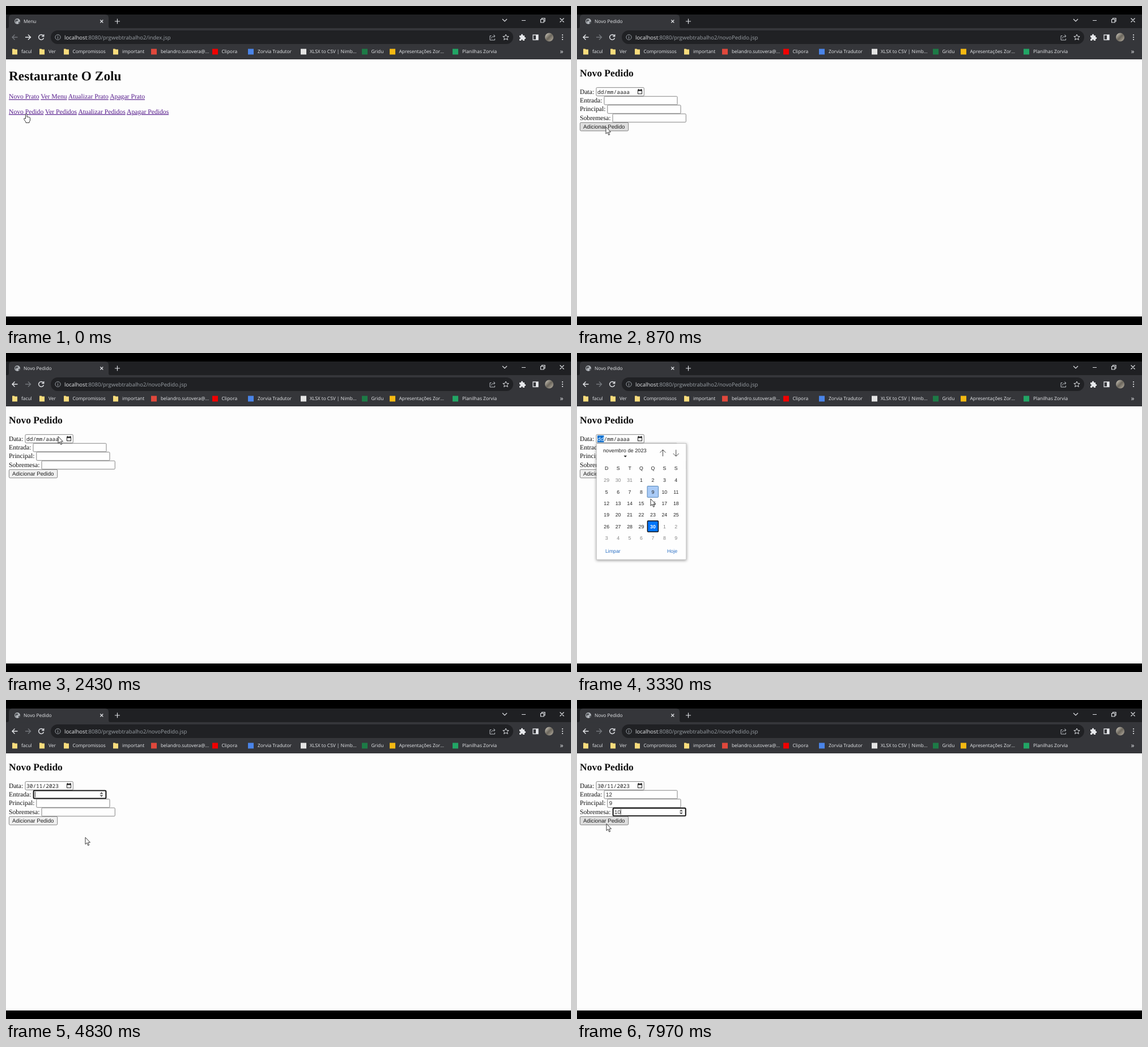
An HTML page for the animation above (8 s loop, 997 by 562 pixels).

```html
<!DOCTYPE html>
<html lang="pt-BR">
<head>
<meta charset="utf-8">
<title>Novo Pedido</title>
<style>
  html, body { margin: 0; width: 100%; height: 100%; overflow: hidden; background: #000; }
  svg { display: block; width: 997px; height: 562px; }
  text { text-rendering: geometricPrecision; white-space: pre; }
  .ui { font: 8.35px "Open Sans", sans-serif; fill: #e8eaed; }
  .url { font-size: 9.55px; fill: #9aa0a6; }
  .page { font: 11.68px "Liberation Serif", serif; fill: #111; }
  .links { fill: #551a8b; }
  .links tspan { text-decoration: underline; }
  .form { font: 9.73px "Liberation Sans", sans-serif; fill: #222; }
  .date { font: 9.5px "Noto Sans Mono", monospace; fill: #222; }
  .cal { font: 8.76px "Liberation Sans", sans-serif; fill: #222; }
  .mid { text-anchor: middle; }
  .line { fill: none; stroke: #dfe1e5; stroke-width: 1.2; }
  .box { fill: #fefefe; stroke: #767676; stroke-width: .9; }
  .ring { fill: none; stroke: #101010; stroke-width: 1.8; }
</style>
</head>
<body>
<svg viewBox="0 0 997 562">
  <defs>
    <linearGradient id="photo" x2="1" y2="1">
      <stop stop-color="#d9d4c8"/><stop offset=".5" stop-color="#6b665c"/><stop offset="1" stop-color="#b9b2a4"/>
    </linearGradient>
    <filter id="shadow" x="-10%" y="-10%" width="120%" height="120%">
      <feDropShadow dx="0" dy="1" stdDeviation="2.5" flood-opacity=".45"/>
    </filter>
  </defs>

  <!-- Window -->
  <rect width="997" height="562"/>
  <rect y="15" width="997" height="25" fill="#1f2023"/>
  <rect y="39" width="997" height="55" fill="#35363a"/>
  <path d="M1 39.5q4 0 4-4V21q0-6 6-6H175q6 0 6 6V35.500q0 4 4 4Z" fill="#35363a"/>
  <rect y="94" width="997" height="453" fill="#fdfdfd"/>
  <rect x="79" y="43" width="816" height="24" rx="12" fill="#202124"/>

  <!-- Tab strip -->
  <circle cx="20" cy="27" r="5" fill="#b4b8bd"/>
  <path d="M16 25q3-3 5-1t-2 3 0 3q-3 0-3-3ZM22 28q2-1 3 0-1 3-3 3Z" fill="#55585d"/>
  <text id="tab" class="ui" x="31" y="30"></text>
  <path class="line" d="M166.300 24.500l5 5m0-5l-5 5M192 27h9m-4.500-4.500v9"/>
  <path class="line" d="M876 23l4 4 4-4M910 25.500h7M977.500 21.500l7 7m0-7l-7 7"/>
  <path class="line" stroke-width="1" d="M943.500 23.500h5.500v5.500h-5.500ZM945.500 23.500v-2h5.500v5.500h-2"/>

  <!-- Toolbar -->
  <path id="back" class="line" style="stroke-width:1.4" d="M20.500 55h-9.500m4.500-4.500l-4.500 4.500 4.500 4.500"/>
  <path id="forward" class="line" style="stroke-width:1.4" d="M34 55h9.500m-4.500-4.500l4.500 4.500-4.500 4.500"/>
  <path class="line" style="stroke-width:1.4" d="M65.800 52.300a4.500 4.500 0 1 0 .7 4M66.700 50v3.500h-3.500"/>
  <circle class="line" style="stroke:#9aa0a6;stroke-width:1" cx="91.500" cy="55" r="4.600"/>
  <path class="line" style="stroke:#9aa0a6" d="M91.500 52.200v1.200m0 1.200v3.200"/>
  <text class="ui url" x="103" y="58.500"><tspan fill="#e8eaed">localhost</tspan><tspan id="path"></tspan></text>
  <path class="line" style="stroke:#bdc1c6;stroke-width:1" d="M856.500 52.500h-2.500v7.500h8.500v-2.500M856.500 57q1-4 6.500-4m-2.500-2.500l2.500 2.500-2.500 2.500"/>
  <path class="line" style="stroke-width:1" d="M882 50l1.500 3.400 3.700.3-2.800 2.400.9 3.600-3.300-2-3.300 2 .9-3.600-2.800-2.400 3.700-.3Z"/>
  <path fill="#e8eaed" d="M906 52h3q-.5-2.500 1.500-2.500t1.500 2.500h3v3q2.200-.4 2.200 1.500t-2.200 1.500v3h-3q0-2-1.500-2t-1.500 2h-3v-3q1.800 0 1.800-1.500t-1.800-1.500Z"/>
  <path class="line" style="stroke-width:1.300" d="M930 51h9v8.500h-9Z"/>
  <rect x="935" y="51" width="4" height="8.500" fill="#e8eaed"/>
  <circle cx="958.500" cy="55" r="7.500" fill="url(#photo)"/>
  <g fill="#e8eaed"><circle cx="982" cy="51" r="1.100"/><circle cx="982" cy="55" r="1.100"/><circle cx="982" cy="59" r="1.100"/></g>
  <g id="bookmarks"></g>
  <text class="ui" style="font-size:12px" x="977.500" y="84">»</text>

  <!-- Menu page -->
  <g id="menu" class="page">
    <text x="5" y="131" style="font-size:23.360px;font-weight:bold">Restaurante O Zolu</text>
    <text class="links" x="5" y="163.300"><tspan>Novo Prato</tspan> <tspan>Ver Menu</tspan> <tspan>Atualizar Prato</tspan> <tspan>Apagar Prato</tspan></text>
    <text class="links" x="5" y="189.700"><tspan>Novo Pedido</tspan> <tspan>Ver Pedidos</tspan> <tspan>Atualizar Pedidos</tspan> <tspan>Apagar Pedidos</tspan></text>
  </g>

  <!-- Order form -->
  <g id="order" class="page">
    <text x="5" y="124.300" style="font-size:17.520px;font-weight:bold">Novo Pedido</text>
    <text x="5" y="154.500">Data:</text>
    <rect class="box" x="34" y="143.700" width="84.300" height="14.700" rx="1.500"/>
    <rect id="mark" y="145.300" height="12" fill="#0a6fd0"/>
    <text class="date" x="36" y="154.500"><tspan id="day"></tspan>/<tspan id="month"></tspan>/<tspan id="year"></tspan></text>
    <path fill="#222" d="M107 147.300h1v-1h1.200v1h3.600v-1h1.200v1h1v8h-8ZM108 149.800v4.500h6v-4.500Z" fill-rule="evenodd"/>
    <rect id="iconRing" class="ring" style="stroke-width:1" x="105.500" y="145" width="11" height="12" rx="1"/>
    <g id="fields"></g>
    <rect id="button" class="box" x="5.400" y="205.300" width="85.300" height="14.700" rx="1.800"/>
    <text class="form" x="11" y="216">Adicionar Pedido</text>
  </g>

  <!-- Date picker -->
  <g id="calendar" class="cal">
    <rect x="34.300" y="159.300" width="158.500" height="204.700" fill="#fefefe" stroke="#b5b5b5" stroke-width=".8" filter="url(#shadow)"/>
    <text x="46" y="174.800" style="font-size:9.200px">novembro de 2023</text>
    <path d="M82.500 180.700h5.500l-2.750 3Z" fill="#222"/>
    <path class="line" style="stroke:#444;stroke-width:1" d="M151.500 182v-11.500m-5 5l5-5 5 5M174.700 170.500v11.500m-5-5l5 5 5-5"/>
    <rect id="hover" width="19.500" height="19.800" rx="1" fill="#a9cbf7" stroke="#356ea8" stroke-width=".8"/>
    <rect x="124.400" y="295.700" width="19" height="19.200" rx="1" fill="#0075ff" stroke="#101010" stroke-width="1.500"/>
    <g id="days" class="mid"></g>
    <g fill="#2a6fc4"><text x="50" y="352">Limpar</text><text x="159" y="352">Hoje</text></g>
  </g>

  <g id="cursor" stroke="#222" stroke-width=".9" fill="#fff" stroke-linejoin="round">
    <path id="arrow" d="M0 0V12.200L2.800 9.600 4.800 14.300 6.700 13.500 4.700 9H8.500Z"/>
    <path id="hand" d="M-1.500 8.500V1.200q0-1.200 1.200-1.200T1 1.200V5.500q1-.8 2 .2 1-.6 1.800.4 1.700-.4 1.700 1.400V11q0 2-1.500 3v1.700H-1V14.200Q-3 12-4.300 9.300-4.500 7.500-3 7.900Z"/>
  </g>
</svg>

<script>
const LOOP = 8000;
const OPEN_PAGE = 300, OPEN_PICKER = 2800, PICK_DAY = 3850;
const $ = id => document.getElementById(id);
const show = (id, on) => { $(id).style.display = on ? '' : 'none'; };

function add(parent, tag, attrs, text = '') {
  const node = document.createElementNS('http://www.w3.org/2000/svg', tag);
  for (const key in attrs) node.setAttribute(key, attrs[key]);
  node.textContent = text;
  return parent.appendChild(node);
}

// Bookmarks: icon x, label x, label, icon colour (folders have none)
[
  [11, 27, 'facul'], [59, 75, 'Ver'], [102, 117.500, 'Compromissos'], [189, 205, 'important'],
  [256, 273, 'belandro.sutovera@...', '#e0483c'], [364, 380.500, 'Clipora', '#f00000'],
  [427, 444, 'Zorvia Tradutor', '#4a84e8'], [520, 536, 'XLSX to CSV | Nimb...', '#e4e4e4'],
  [628, 644.500, 'Gridu', '#1d7a46'], [677, 693.500, 'Apresentações Zor...', '#f5b912'],
  [788, 805, 'Planilhas Zorvia', '#22a565']
].forEach(([x, textX, label, color]) => {
  const bar = $('bookmarks');
  if (color) add(bar, 'rect', { x, y: 75.500, width: 10, height: 10, fill: color });
  else add(bar, 'path', { d: `M${x} 75.500h3.500l1.200 1h4.300v9h-9Z`, fill: '#f8dc7c' });
  add(bar, 'text', { class: 'ui', x: textX, y: 83.300 }, label);
});

// Calendar grid
const colX = c => 52.200 + 20.430 * c;
const rowY = r => 224 + 20.400 * r;
[...'DSTQQSS'].forEach((d, c) => add($('days'), 'text', { x: colX(c), y: 205.600 }, d));
for (let i = 0; i < 42; i++) {
  const n = i - 2, inside = n > 0 && n < 31;
  const attrs = { x: colX(i % 7), y: rowY(Math.floor(i / 7)) + 3.100, fill: inside ? '#222' : '#858585' };
  if (n === 30) Object.assign(attrs, { fill: '#fff', 'font-weight': 'bold' });
  add($('days'), 'text', attrs, n < 1 ? n + 31 : inside ? n : n - 30);
}

// Number inputs: focus and blur times, then the time of each typed digit
const fields = [
  { label: 'Entrada:', x: 48, right: 177, focus: 4750, blur: 5900, keys: [[5200, '1'], [5380, '2']] },
  { label: 'Principal:', x: 53.800, right: 183, focus: 5900, blur: 6750, keys: [[6400, '9']] },
  { label: 'Sobremesa:', x: 63, right: 192.300, focus: 6750, blur: LOOP, keys: [[6850, '1'], [6950, '0']] }
];
fields.forEach((f, i) => {
  const y = 159.200 + 15.400 * i, width = f.right - f.x, g = $('fields');
  add(g, 'text', { x: 5, y: y + 10.800 }, f.label);
  add(g, 'rect', { class: 'box', x: f.x, y, width, height: 14.700, rx: 1.500 });
  f.text = add(g, 'text', { class: 'form', x: f.x + 3, y: y + 10.700 });
  f.active = add(g, 'g', {});
  add(f.active, 'rect', { class: 'ring', x: f.x + .7, y: y + .5, width: width - 1.400, height: 13.700, rx: 1.500 });
  const mid = f.right - 8.500;
  add(f.active, 'path', { d: `M${mid - 3} ${y + 6.200}h6l-3-3.200ZM${mid - 3} ${y + 8.300}h6l-3 3.200Z`, fill: '#555' });
  f.caret = add(f.active, 'rect', { y: y + 2.300, width: .8, height: 10, fill: '#111' });
});

// Pointer path: time, x, y
const track = [
  [0, 36, 190], [350, 36, 190], [800, 51, 213], [1050, 51, 213], [1650, 70, 190], [2150, 92, 147],
  [2530, 92, 147], [2740, 110, 149], [2950, 111, 151], [3330, 130, 257], [3650, 134, 302],
  [3900, 134, 302], [4300, 140, 242], [7540, 140, 242], [7920, 52, 218], [LOOP, 52, 218]
];
function pointer(t) {
  const i = Math.max(1, track.findIndex(p => p[0] >= t));
  const [t0, x0, y0] = track[i - 1], [t1, x1, y1] = track[i];
  const u = Math.max(0, (t - t0) / (t1 - t0)), s = u * u * (3 - 2 * u);
  return [x0 + (x1 - x0) * s, y0 + (y1 - y0) * s];
}

function drawDate(t) {
  const picked = t >= PICK_DAY;
  const parts = picked ? ['30', '11', '2023'] : ['dd', 'mm', 'aaaa'];
  // Tab moves through day, month, year and the picker icon
  const part = t < OPEN_PICKER || t >= 4750 ? -1 : t < 4250 ? 0 : t < 4420 ? 1 : t < 4590 ? 2 : 3;
  ['day', 'month', 'year'].forEach((id, i) => {
    $(id).textContent = parts[i];
    $(id).style.fill = part === i ? '#fff' : '';
  });
  show('mark', part >= 0 && part < 3);
  $('mark').setAttribute('x', 36 + 17.100 * Math.max(0, part));
  $('mark').setAttribute('width', part === 2 ? 23 : 11.500);
  show('iconRing', part === 3);
}

function drawPicker(t) {
  const open = t >= OPEN_PICKER && t < PICK_DAY;
  show('calendar', open);
  if (!open) return;
  const [x, y] = pointer(t - 50);
  const c = Math.round((x - colX(0)) / 20.430), r = Math.round((y - rowY(0)) / 20.400);
  show('hover', r >= 0 && r < 6);
  $('hover').setAttribute('x', colX(c) - 8 - 1.900);
  $('hover').setAttribute('y', rowY(r) - 9.900);
}

function drawFields(t) {
  for (const f of fields) {
    const typed = f.keys.filter(k => t >= k[0]);
    const focused = t >= f.focus && t < f.blur;
    const since = t - (typed.length ? typed[typed.length - 1][0] : f.focus);
    f.text.textContent = typed.map(k => k[1]).join('');
    f.active.style.display = focused ? '' : 'none';
    f.caret.style.display = since % 1000 < 500 ? '' : 'none';
    f.caret.setAttribute('x', f.x + 3 + 5.410 * typed.length);
  }
}

function draw(t) {
  const ordering = t >= OPEN_PAGE;
  const [x, y] = pointer(t);
  show('menu', !ordering);
  show('order', ordering);
  $('tab').textContent = ordering ? 'Novo Pedido' : 'Menu';
  $('path').textContent = ':8080/prgwebtrabalho2/' + (ordering ? 'novoPedido.jsp' : 'index.jsp');
  $('back').style.stroke = ordering ? '#e8eaed' : '#74777c';
  $('forward').style.stroke = ordering ? '#74777c' : '#e8eaed';
  drawDate(t);
  drawPicker(t);
  drawFields(t);
  const overButton = x > 5 && x < 91 && y > 205 && y < 221;
  $('button').style.fill = overButton ? '#dedede' : '#efefef';
  show('hand', !ordering);
  show('arrow', ordering);
  $('cursor').setAttribute('transform', `translate(${x} ${y})`);
}

const start = performance.now();
function tick() {
  draw((performance.now() - start) % LOOP);
  requestAnimationFrame(tick);
}
tick();
</script>
</body>
</html>
```
